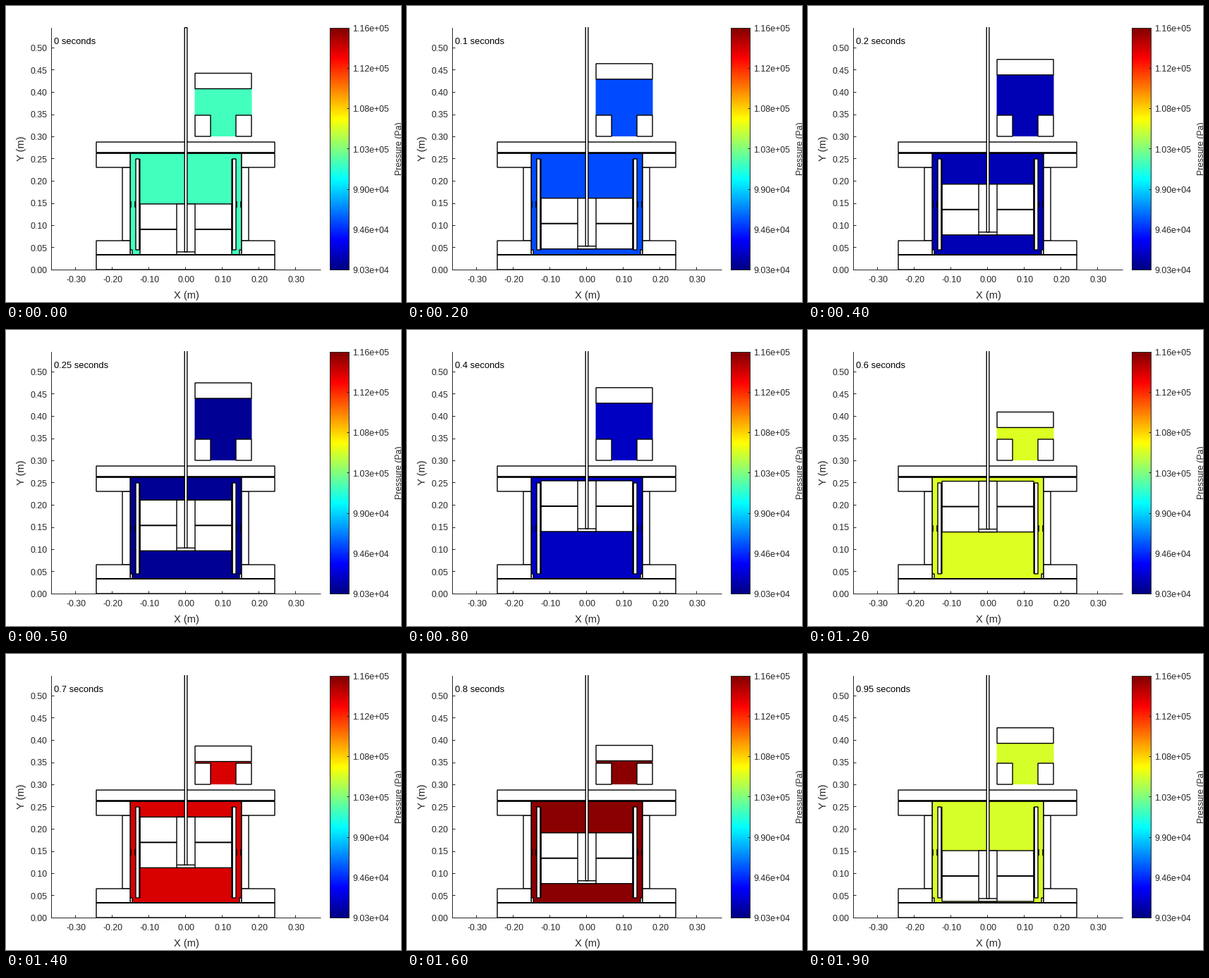
These frames come from a looping animation (560 px wide and 420 px high, 2000 ms). A matplotlib script:

```python
import numpy as np
import matplotlib.pyplot as plt
from matplotlib.animation import FuncAnimation
from matplotlib.patches import Rectangle

W, H, DPI = 560, 420, 100
FRAMES, INTERVAL = 20, 100
PX = 72 / DPI
DARK = "#262626"
EDGE = 1.4
plt.rcParams["font.family"] = "Liberation Sans"

fig = plt.figure(figsize=(W / DPI, H / DPI), dpi=DPI, facecolor="white")
ax = fig.add_axes([0, 0, 1, 1])
ax.axis("off")


def jet(x):
    x = np.clip(x, 0.01, 0.99)
    return tuple(np.clip(1.5 - abs(4 * x - k), 0, 1) for k in (3, 2, 1))


def box(x0, y0, x1, y1, face="white", edge="black", lw=EDGE):
    patch = Rectangle((x0, y0), x1 - x0, y1 - y0, facecolor=face,
                      edgecolor=edge, linewidth=lw * PX, joinstyle="miter",
                      snap=False)
    return ax.add_patch(patch)


def gas(x0, y0, x1, y1):
    return box(x0, y0, x1, y1, edge="none", lw=0)


def line(x0, y0, x1, y1, color="black", lw=2.0):
    return ax.plot([x0, x1], [y0, y1], color=color, lw=lw * PX,
                   solid_capstyle="butt", snap=False)[0]


def rule(x0, y0, x1, y1):
    """Thin axis line, centred on whole pixels."""
    return line(x0 + 0.5, y0 + 0.5, x1 + 0.5, y1 + 0.5, DARK, 1)


def label(x, y, text, size=12.4, color=DARK, **kw):
    return ax.text(x, y, text, fontsize=size * PX, color=color,
                   va="baseline", rotation_mode="anchor", **kw)


def span(patch, y0, y1):
    patch.set_y(y0)
    patch.set_height(y1 - y0)


# Motion laws, t in revolutions of the crank
def displacer_top(t):
    a = 2 * np.pi * t
    return 243.2 + 36.3 * np.cos(a) + 1.4 * np.cos(2 * a) - 0.5 * np.sin(a)


def piston_bottom(t):
    a = 2 * np.pi * t
    return (121.8 - 28.6 * np.sin(a) - 0.6 * np.cos(a)
            - 3.8 * np.cos(2 * a) + 0.5 * np.sin(2 * a))


def pressure(t):
    u = 2 * np.pi * (t - 0.775)
    return (0.429 + 0.485 * np.cos(u) + 0.074 * np.cos(2 * u)
            + 0.015 * np.cos(3 * u) + 0.008 * np.cos(4 * u)
            + 0.01 * np.sin(u) - 0.015 * np.sin(2 * u))


# Colour bar
shades = np.array([jet(v) for v in np.linspace(1, 0, 256)])[:, None, :]
ax.imshow(shades, extent=(459, 487, 375, 31), aspect="auto",
          interpolation="nearest")
box(459.5, 31.5, 486.5, 374.5, face="none", edge=DARK, lw=1)
bar_names = ["1.16e+05", "1.12e+05", "1.08e+05", "1.03e+05",
             "9.90e+04", "9.46e+04", "9.03e+04"]
for i, name in enumerate(bar_names):
    y = 31 + i * 343 / 6
    rule(483, round(y), 486, round(y))
    label(491.5, y + 5, name)
label(560.5, 202.5, "Pressure (Pa)", 12.2, rotation=90, ha="center")

# Axes
rule(64, 30.5, 64, 374.5)
rule(63.5, 374, 446, 374)
for i in range(7):
    x = 99 + 52 * i
    rule(x - 1, 370, x - 1, 374)
    label(x + 0.2, 392.5, f"{-0.3 + 0.1 * i:.2f}".replace("-0.00", "0.00"),
          ha="center")
for i in range(11):
    y = 374 - 31.5 * i
    rule(64, round(y), 68, round(y))
    label(58.5, y + 5, f"{0.05 * i:.2f}", ha="right")
label(255.5, 414.5, "X (m)", 14.67, ha="center")
label(25.8, 202.3, "Y (m)", 14.67, rotation=90, ha="center")
clock = label(68.5, 54, "", 13, "black")

# Large chamber with the displacer
chamber = box(176, 209, 334, 353)
for x in (176, 331):
    box(x, 346, x + 3, 353)
body = box(190, 0, 320, 1)
middle = line(190, 0, 320, 0)
hub = box(242, 0, 268, 1)
foot = line(242, 0, 268, 0, lw=EDGE)
for part, z in ((middle, 1), (hub, 1.1), (foot, 1.2)):
    part.set_zorder(z)

for x in (184, 321):
    box(x, 217, x + 5, 346)
for x in (189.5, 320.5):
    line(x, 217, x, 346)
for x in (177, 183, 327, 333):
    line(x, 277, x, 286, lw=1.6)

# Fixed frame
box(128, 193, 381, 208)
box(128, 353, 381, 374)
for x0, x1, w0, w1 in ((128, 176, 165, 176), (334, 381, 334, 344)):
    box(w0, 229, w1, 333)
    box(x0, 209, x1, 229)
    box(x0, 333, x1, 353)
line(128, 208.5, 381, 208.5)
line(128, 353, 381, 353)

rod = box(253.2, 30, 256.8, 349)
rod.set_zorder(3)
rod.set_clip_path(Rectangle((0, 30), W, H, transform=ax.transData))

# Small cylinder with the power piston
upper = gas(267.5, 100, 348.5, 155)
lower = gas(290, 155, 326, 185)
for x in (268, 326):
    box(x, 155, x + 22, 185)
piston = box(268, 0, 348, 22)

ax.set_xlim(0, W)
ax.set_ylim(H, 0)


def draw(i):
    t = i / FRAMES
    top, low = displacer_top(t), piston_bottom(t)
    color = jet(pressure(t))
    for part in (chamber, upper, lower):
        part.set_facecolor(color)
    span(body, top, top + 72)
    span(hub, top, top + 72)
    middle.set_ydata([top + 36] * 2)
    foot.set_ydata([top + 68] * 2)
    span(rod, top - 250.2, top + 68)
    span(piston, low - 22, low)
    span(upper, low, 155)
    clock.set_text(f"{round(t, 2):g} seconds")
    return []


anim = FuncAnimation(fig, draw, frames=FRAMES, interval=INTERVAL,
                     init_func=lambda: draw(0), repeat=True, repeat_delay=0)
plt.show()
```
